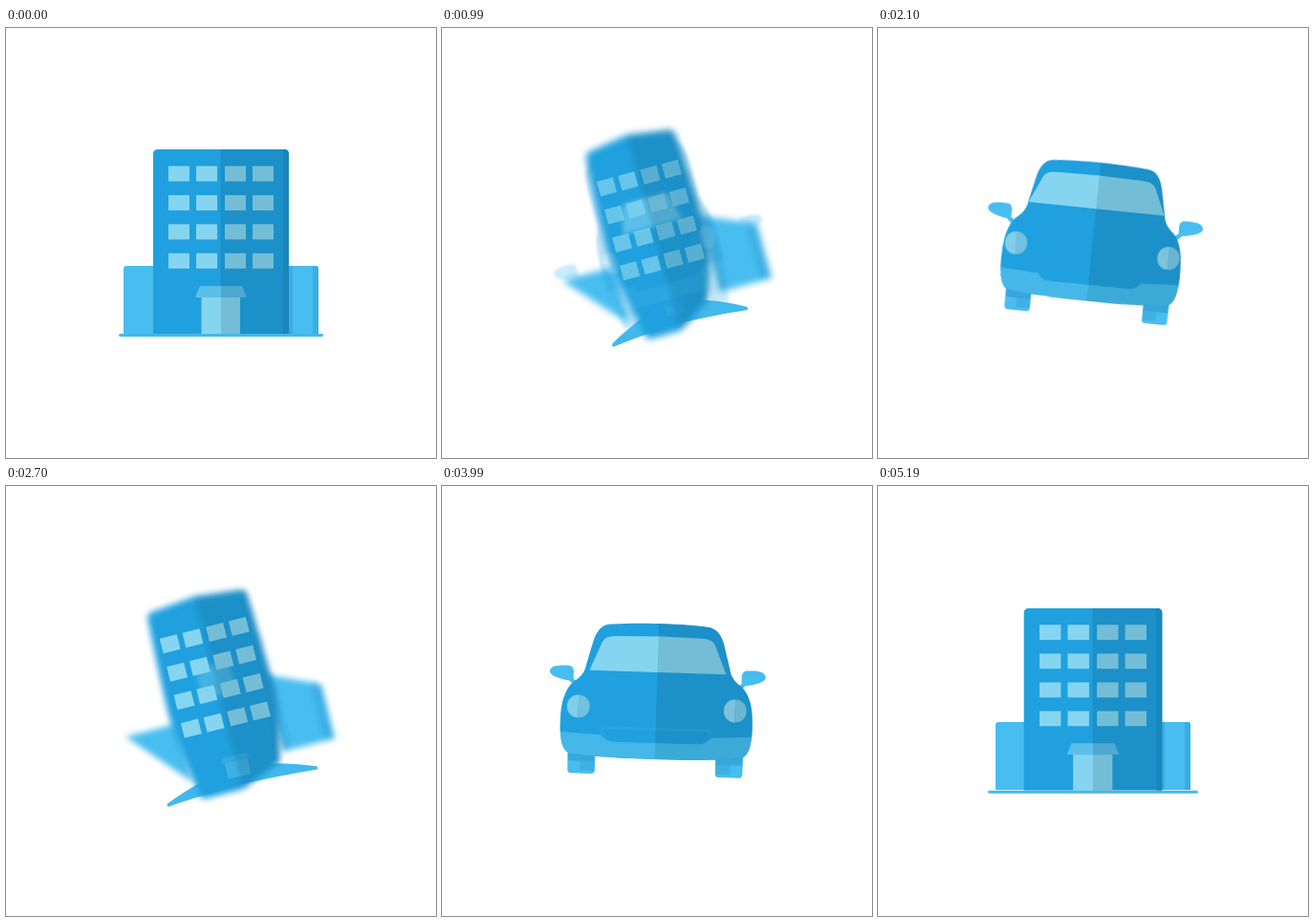
These frames come from a looping animation (450x450 px, 5.22 s). An HTML page:

```html
<!DOCTYPE html>
<html lang="en">
<head>
<meta charset="utf-8">
<title>Building and car</title>
<style>
  html, body { margin: 0; width: 100%; height: 100%; overflow: hidden; background: #fff; }
  svg { display: block; width: 100vw; height: 100vh; }
</style>
</head>
<body>
<svg viewBox="0 0 450 450"><g id="root"></g></svg>
<script>
const NS = 'http://www.w3.org/2000/svg';
const root = document.getElementById('root');
const HALF = 870, STEP = 30, MID = 225;
const BLUE = '#20a0de', DEEP = '#1c90c8', SKY = '#48bdf0', GLASS = '#86d5f0', GLASS2 = '#74bdd6';

const clamp = v => Math.max(0, Math.min(1, v));
const ramp = (t, a, b) => clamp((t - a) / (b - a));
const smooth = v => v * v * (3 - 2 * v);
const mix = (a, b, v) => a + (b - a) * v;
const sq = v => v * v;

const eachPoint = (d, fn) => d.replace(/(-?[\d.]+),(-?[\d.]+)/g, (_, x, y) => {
  const [u, v] = fn(+x, +y);
  return u.toFixed(2) + ',' + v.toFixed(2);
});
const mirror = d => eachPoint(d, (x, y) => [2 * MID - x, y]);
const box = (x, y, w, h) => `M${x},${y}L${x + w},${y}L${x + w},${y + h}L${x},${y + h}Z`;

function group(parent) {
  const g = document.createElementNS(NS, 'g');
  parent.appendChild(g);
  return g;
}
const parts = [];
function part(parent, warp, fill, d) {
  const el = document.createElementNS(NS, 'path');
  el.setAttribute('fill', fill);
  parent.appendChild(el);
  parts.push({ el, warp, d });
  return el;
}

// Warps take and return coordinates measured from the stage centre; s is the state.
const grow = (x, y, s) => [
  x * (1 + .4 * s.q),
  y * (1 - (y < 0 ? .2 : .33) * s.q)
];
const warps = {
  tower(x, y, s) {
    const low = Math.max(0, y / 95), high = Math.max(0, -y / 98);
    const f = 1 - s.k * (.2 + .05 * sq(high) + .18 * sq(low));
    const cut = y > 60 && x * s.dir < -30 ? 18 * s.k : 0;
    const rise = s.k * sq(high) * (15 - 7 * sq(sq(x / 71)));
    return grow(x * f, y - rise - cut, s);
  },
  windows: (x, y, s) => grow(x * (1 - .155 * s.k), y + 1.5 * s.k, s),
  door: (x, y, s) => grow(x * (1 - .4 * s.k), mix(y, 70 + (y - 70) * .45, s.k), s),
  wing(x, y, s) {
    const k = Math.min(1, s.k), side = Math.sign(x);
    const u = (Math.abs(x) - 71) / 31, top = (95 - y) / 71;
    const ax = Math.abs(x) + k * (25 * u - 21);
    const ny = x * s.dir > 0
      ? mix(y, 12 + (y - 24) * .88 * (1 - u), k)
      : y - k * (28 - top * (24 * u - 12));
    return [side * ax, ny - 45 * s.q];
  },
  base(x, y, s) {
    const nx = x * (1 - .24 * s.k) * (1 + .6 * s.q);
    const bow = (y < 96 ? 20 : 4) * (1 - sq(x / 107));
    return [Math.max(-115, Math.min(115, nx)), y - s.k * (4 + bow) - 25 * s.q];
  },
  body(x, y, s) {
    const up = Math.max(0, -y / 78);
    return [
      x * (1 - .45 * s.c * (1 - .6 * up)) * (1 - .32 * s.r),
      (y - 26 * s.c * up) * (1 + (y < 0 ? .25 : .5) * s.r)
    ];
  },
  lamp: (x, y, s) => [x * (1 - .45 * sq(s.c)) * (1 - .32 * s.r), y],
  wheel: (x, y, s) => [x * (1 - .45 * s.c) * (1 - .2 * s.r), y + 18 * s.r],
  mirrors: (x, y, s) => [x * (1 - .08 * s.r), y + 40 * sq(s.c) + 50 * s.r],
  glass(x, y, s) {
    const ny = -25 + (y + 25) * (1 - .5 * s.c * s.glass);
    return [x * s.glass * (1 - .32 * s.r), ny + 45 * (1 - s.glass) - 43 * s.c * s.glass - 20 * s.r];
  }
};

// Building
const building = group(root);
const wings = group(building), ground = group(building), tower = group(building);
const entrance = group(building), fittings = group(building);
const wing = 'M154,249L126,249Q123,249 123,252L123,320L154,320Z';
part(wings, warps.wing, SKY, wing);
part(wings, warps.wing, SKY, mirror(wing));
part(wings, warps.wing, '#3aaee2', 'M321,249L324,249Q327,249 327,252L327,320L321,320Z');
part(wings, warps.wing, '#3bade0', box(296, 249, 4, 71));
part(ground, warps.base, '#42b9ec',
  'M119,320C160,320 190,320 225,320C260,320 290,320 331,320Q333,321.5 331,323C290,323 260,323 225,323C190,323 160,323 119,323Q117,321.5 119,320Z');
const towerHalf = 'M225.5,127L159,127Q154,127 154,132C154,170 154,200 154,225C154,255 154,290 154,320L225.5,320Z';
part(tower, warps.tower, BLUE, towerHalf);
part(tower, warps.tower, DEEP, mirror(towerHalf));
part(tower, warps.tower, '#1a86bc',
  'M290,127L291,127Q296,127 296,132C296,170 296,200 296,225C296,255 296,290 296,320L290,320C290,290 290,255 290,225C290,200 290,170 290,127Z');
for (let row = 0; row < 4; row++) {
  [170, 199, 229, 258].forEach((x, col) =>
    part(fittings, warps.windows, col < 2 ? GLASS : GLASS2, box(x, 144.5 + row * 30.4, 22, 16)));
}
part(entrance, warps.door, GLASS, box(204.5, 282, 20.5, 38));
part(entrance, warps.door, GLASS2, box(225, 282, 20, 38));
part(entrance, warps.door, '#5bbfea', 'M225,270L203,270L198,282L225,282Z');
part(entrance, warps.door, '#4ea8d1', 'M225,270L247,270L252,282L225,282Z');

// Car
const car = group(root);
const wheel = 'M128,280L158.5,280L158.5,300Q158,303 155,303L132,303Q129,303 128.5,300Z';
const doorMirror = 'M112,197C112,192 117,190.5 124,190L131,190Q136,190 137,195L137,204L143,208L138,211L133,206Q113,203 112,197Z';
for (const flip of [d => d, mirror]) {
  part(car, warps.wheel, SKY, flip(wheel));
  part(car, warps.wheel, '#3fb0e2', flip(box(142, 283, 16, 17)));
  part(car, warps.wheel, '#38a6d8', flip(box(129, 281, 29, 9)));
  part(car, warps.mirrors, SKY, flip(doorMirror));
}
const shell = 'M225.5,147C200,147 186,148 173,149C162,150 158,158 155,165L147,190C145,200 139,204 133,208C123,216 119,230 119,246C118,262 121,276 129,282C150,285 190,286 225.5,286Z';
const bumper = 'M225.5,269L178,269Q169,269 164,262L119.5,260C120,272 123,279 129,282C150,285 190,286 225.5,286Z';
part(car, warps.body, BLUE, shell);
part(car, warps.body, DEEP, mirror(shell));
part(car, warps.body, '#45b7e9', bumper);
part(car, warps.body, '#3caad7', mirror(bumper));
const rim = 'M225.5,253L166,253Q163,253 164,257Q166,270 178,271L225.5,271Z';
const grill = 'M225.5,256L169,256Q166,256 167,260Q169,268 178,269L225.5,269Z';
const rims = [
  part(car, warps.body, '#40b0e4', rim),
  part(car, warps.body, '#35a3d2', mirror(rim))
];
part(car, warps.body, BLUE, grill);
part(car, warps.body, DEEP, mirror(grill));
const lampHalf = (x, side) =>
  `M${x},221C${x + side * 16},221 ${x + side * 16},245 ${x},245Z`;
part(car, warps.lamp, '#82cdea', lampHalf(142.5, -1));
part(car, warps.lamp, '#73c0e0', lampHalf(142.5, 1));
part(car, warps.lamp, '#7cc2db', lampHalf(307.5, -1));
part(car, warps.lamp, '#6cb5d1', lampHalf(307.5, 1));

const glass = group(root);
const pane = 'M225.5,160L180,161Q169,161 166,168L153.5,200L225.5,200Z';
part(glass, warps.glass, GLASS, pane);
part(glass, warps.glass, GLASS2, mirror(pane));

const blur = (el, px) => el.style.filter = px > .1 ? `blur(${px.toFixed(2)}px)` : 'none';
const fade = (el, v) => el.setAttribute('opacity', clamp(v));

function draw(time) {
  const cycle = time % (2 * HALF), t = cycle % HALF;
  const dir = cycle < HALF ? 1 : -1;
  const settle = 1 - ramp(t, 540, 620);
  const x = t / 130;
  const swing = Math.pow(x * Math.exp(1 - x), 1.5) * settle;
  const r = smooth(ramp(t, 640, 870));
  const back = t > 640;
  const s = {
    dir, r,
    k: back ? 0 : Math.min(1.3, Math.pow(t / 90, 1.3)),
    q: back ? 1 - r : 0,
    c: Math.min(1, Math.exp((100 - t) / 190)) * settle,
    glass: smooth(ramp(t, -10, 270))
  };
  root.setAttribute('transform', `rotate(${dir * (dir > 0 ? 18 : 15.4) * swing} ${MID} ${MID})`);
  for (const p of parts) {
    p.el.setAttribute('d', eachPoint(p.d, (px, py) => {
      const [u, v] = p.warp(px - MID, py - MID, s);
      return [u + MID, v + MID];
    }));
  }
  const carFade = 1 - ramp(t, 700, 780);
  fade(building, back ? ramp(t, 660, 720) : 1 - ramp(t, 130, 220));
  fade(entrance, 1 - .7 * s.k);
  fade(car, ramp(t, 95, 180) * carFade);
  fade(glass, ramp(t, 40, 180) * carFade);
  rims.forEach(el => fade(el, 1 - 6 * s.c));
  blur(tower, 3 * s.k);
  blur(wings, 3 * s.k);
  blur(car, 2.5 * Math.max(0, s.c - .2));
  blur(glass, 4 * (1 - s.glass));
}

const start = performance.now();
function frame() {
  const elapsed = performance.now() - start;
  draw(Math.floor((elapsed + 1) / STEP) * STEP);
  requestAnimationFrame(frame);
}
draw(0);
requestAnimationFrame(frame);
</script>
</body>
</html>
```
